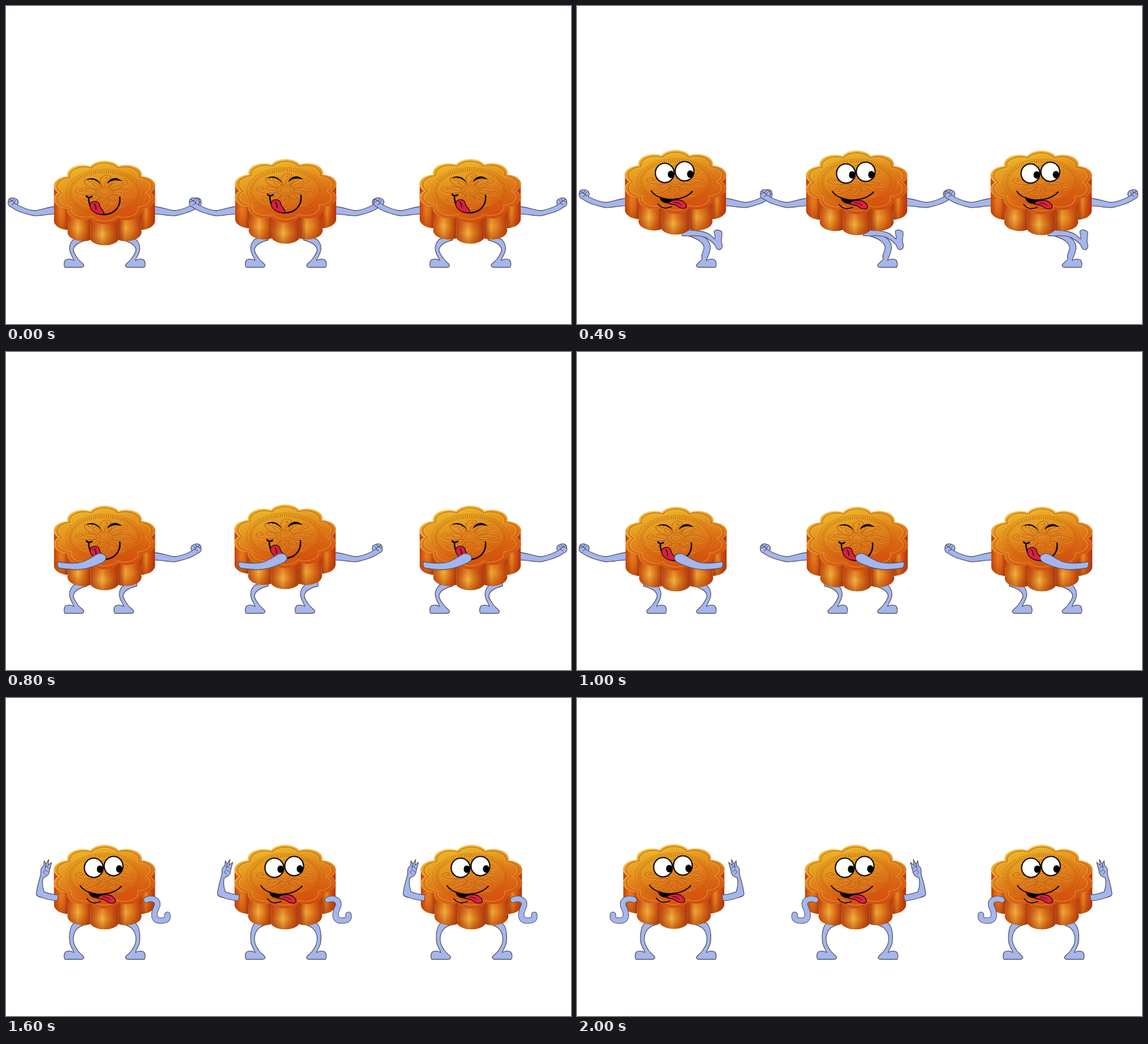
An HTML page for the animation above (2.2 s loop, 998 px wide and 561 px high).

```html
<!DOCTYPE html>
<html lang="en">
<head>
<meta charset="utf-8">
<title>Dancing mooncakes</title>
<style>
  html, body { margin: 0; width: 100%; height: 100%; overflow: hidden; background: #fff; }
  svg { display: block; width: 100vw; height: 100vh; }
  .limb { fill: #a5b5ee; stroke: #55565e; stroke-width: 1.3; stroke-linejoin: round; }
  .line { fill: none; stroke: #3d4050; stroke-width: 1; stroke-linecap: round; }
  .ink { fill: none; stroke: #0b0706; stroke-width: 2.6; stroke-linecap: round; }
</style>
</head>
<body>
<svg id="stage" viewBox="0 0 998 561" xmlns="http://www.w3.org/2000/svg"></svg>
<script>
const STEP = 200;
const CX = 174, CY = 329, WALL = 38, TILT = 0.6;
const VALLEY = 80, BUMP = 27;

const path = (d, attrs = '') => `<path d="${d}" ${attrs}/>`;
const limb = d => path(d, 'class="limb"');
const line = d => path(d, 'class="line"');
const group = (id, body) => `<g id="${id}">${body}</g>`;
const use = (id, transform = '') => `<use href="#${id}" transform="${transform}"/>`;
const mirrored = id => use(id, 'translate(348.5 0) scale(-1 1)');
const stops = list => list.map(([at, color]) => `<stop offset="${at}" stop-color="${color}"/>`).join('');
const gradient = (id, list, box = 'x2="1" y2="0"') => `<linearGradient id="${id}" ${box}>${stops(list)}</linearGradient>`;

// Cake: ten petals seen at a tilt, with a fluted wall below the front five.
const valley = (i, k = 1, drop = 0) => {
  const a = i * Math.PI / 5;
  return `${(CX + VALLEY * k * Math.cos(a)).toFixed(1)} ${(CY + drop + VALLEY * TILT * k * Math.sin(a)).toFixed(1)}`;
};
const bump = (k = 1) => `A${BUMP * k} ${BUMP * TILT * k} 0 0 1 `;

function flower(k) {
  let d = 'M' + valley(0, k);
  for (let i = 1; i <= 10; i++) d += bump(k) + valley(i, k);
  return d + 'Z';
}

function pillar(i) {
  const start = i === 0 ? 'M263.2 314V379' : `M${valley(i)}L${valley(i, 1, WALL)}`;
  const end = i === 4 ? '84.8 379V314' : `${valley(i + 1, 1, WALL)}L${valley(i + 1)}`;
  return path(start + bump() + end + 'Z', `fill="url(#wall${i})"`) +
    path(start + bump() + end + 'Z', 'fill="url(#shade)"');
}

function relief() {
  const scroll = 'M12 -3C22 -14 40 -18 50 -8C54 2 42 8 39 -1C39 -6 45 -6 45 -2M14 4C24 9 34 9 37 5';
  let marks = '<circle r="9"/><circle r="14" opacity=".5"/>';
  for (let i = 0; i < 8; i++) {
    marks += `<g transform="rotate(${i * 45 + 10})">${path(scroll)}<ellipse cx="25" rx="10" ry="4"/></g>`;
  }
  const layer = (color, shift) =>
    `<g transform="translate(${CX} ${CY + shift}) scale(1 ${TILT})" fill="none" stroke="${color}" stroke-width="2">${marks}</g>`;
  const ring = (r, attrs) => `<ellipse cx="${CX}" cy="${CY}" rx="${r}" ry="${r * TILT}" fill="none" ${attrs}/>`;
  return ring(68, 'stroke="#b9500c" stroke-opacity=".35" stroke-width="1.2"') +
    ring(61, 'stroke="#b4510a" stroke-opacity=".6" stroke-width="6" stroke-dasharray="1.3 2.5"') +
    layer('#efab40a0', 1.1) + layer('#b9560ca8', 0);
}

const cake =
  path('M86 316H262V379H86Z', 'fill="#b93a0a"') +
  [0, 4, 1, 3, 2].map(pillar).join('') +
  path(flower(1), 'fill="url(#top)" stroke="url(#rim)" stroke-width="1.6"') +
  path(flower(0.94), 'fill="none" stroke="#c4600f" stroke-opacity=".75" stroke-width="1.5"') +
  path(flower(0.91), 'fill="none" stroke="#f3bb4c" stroke-opacity=".5" stroke-width="1.2"') +
  relief();

// Faces
const laugh =
  path('M140 308C148 301 161 302 168 315C159 306 151 304 140 308Z') +
  path('M178 314C183 302 196 300 205 309C194 306 186 307 178 314Z') +
  path('M142 335Q145 340 152 336M146 338C146 356 156 368 174 368C192 367 203 354 201 337', 'class="ink"') +
  path('M149 349C152 343 162 343 165 350C165 357 174 361 173 367C166 369 155 366 150 358C148 355 148 352 149 349Z',
    'fill="#d91f43" stroke="#20090a" stroke-width="1.4"') +
  path('M156 349Q159 353 159 359', 'class="ink" style="stroke-width:1.6"');

const eye = (x, y, px, py) =>
  `<ellipse cx="${x}" cy="${y}" rx="16.6" ry="17" fill="#fff" stroke="#0b0706" stroke-width="2.2"/>` +
  `<ellipse cx="${px}" cy="${py}" rx="5.6" ry="6.6"/>`;
const goofy =
  eye(155, 313.5, 166, 316) + eye(190, 310.5, 200, 315.5) +
  path('M146 355C146 364 154 368 166 367L175 360C164 360 154 359 146 355Z') +
  path('M161 367C165 361 176 360 184 362C190 364 195 371 193 374C189 378 181 376 176 371C171 368 166 369 161 367Z',
    'fill="#dc2340" stroke="#20090a" stroke-width="1.4"') +
  path('M171 365Q179 365 184 370', 'class="ink" style="stroke-width:1"') +
  path('M131 345C142 363 185 367 204 346', 'class="ink" style="stroke-width:2"') +
  path('M143 368C149 376 158 377 167 373', 'class="ink" style="stroke-width:1.8"');

// Limbs, drawn for one side and mirrored for the other.
const reach =
  limb('M92 353C75 354 66 359 52 361C40 361 28 355 20 351C23 346 22 341 15 339C9 337 4 340 4 345C3 350 5 354 10 355C20 363 35 367 50 370C62 371 75 366 92 367Z') +
  line('M5 346L11 343L15 348L10 351M14 340L11 345M17 343L14 347L19 350M6 341L10 343');
const across =
  limb('M257 370C240 373 225 374 212 370C203 366 196 362 190 358C183 353 172 356 172 363C172 369 178 372 184 374C195 379 210 384 226 384C238 384 250 382 255 381C258 378 258 373 257 370Z');
const salute =
  limb('M91 364L80 367C76 356 70 345 69 337C69 331 76 328 84 325C92 321 100 318 106 316C110 312 115 309 121 309L130 311L127 314L136 315L129 319C122 323 112 323 104 324C96 327 88 331 85 336C86 345 91 355 91 364Z') +
  line('M109 315L118 313L122 316M112 319L118 317L122 320M121 312L128 314L122 317');
const raise =
  limb('M256 347C264 348 274 344 281 342C284 334 285 325 283 317C276 315 272 311 272 305L268 290L274 295L273 285L278 293L281 287L282 296C288 299 287 306 287 311C290 322 294 334 295 346C294 350 290 351 285 352C275 356 265 357 258 358Z') +
  line('M273 301L277 296L280 301M274 307L279 303L283 307L279 311M278 293L279 298');
const curlPath = 'M248 370.5C259 366 269 371 267 381C262 391 258 405 270 407C280 408 287 406 285 397';
const curl = ['#55565e" stroke-width="11', '#a5b5ee" stroke-width="8.8']
  .map(s => path(curlPath, `fill="none" stroke-linecap="round" stroke="${s}"`)).join('');

const foot = 'C115 446 109 446 105 448C102 452 102 458 104 461L133 461C137 461 139 458 136 455C132 451 129 449 127 446';
const leg = lift => limb(
  `M120 ${411 - lift}C112 ${418 - lift} 111 ${427 - lift / 2} 113 433C115 440 119 445 120 449${foot}` +
  `C124 441 118 435 119 ${429 - lift / 2}C121 ${421 - lift} 130 ${416 - lift} 143 ${413 - lift}V${405 - lift}Z`);
const kick =
  limb(`M152 396C125 402 112 414 113 428C115 440 119 445 120 449${foot}C131 442 125 434 124 426C126 414 142 408 160 403Z`) +
  limb('M163 395C140 395 120 398 113 404L105 411C103 408 107 402 106 397C103 394 97 395 93 398C91 404 95 412 93 418C91 424 92 429 97 430C102 430 103 426 105 421C112 414 118 409 126 407C138 403 150 407 163 405Z');

const up = 'translate(0 -14.5)';
const lifted = (id, side = s => use(s)) => `<g transform="${up}">${side(id)}</g>`;

const legs = {
  squat: use('leg') + mirrored('leg'),
  tall: use('longLeg') + mirrored('longLeg'),
  stepLeft: use('leg') + use('leg', 'translate(88 0)'),
  stepRight: mirrored('leg') + use('leg', 'translate(260.5 0) scale(-1 1)'),
  kickLeft: use('kick'),
  kickRight: mirrored('kick')
};
const arms = {
  wide: [use('reach') + mirrored('reach'), ''],
  wideUp: [lifted('reach') + lifted('reach', mirrored), ''],
  pointLeft: [use('reach'), use('across')],
  pointRight: [mirrored('reach'), mirrored('across')],
  saluteLeft: ['', use('salute') + use('curl')],
  saluteRight: ['', mirrored('salute') + mirrored('curl')],
  waveLeft: ['', mirrored('raise') + lifted('curl')],
  waveRight: ['', use('raise') + lifted('curl', mirrored)]
};

// face, arms, legs, limb x per dancer, cake x per dancer, cake y per dancer
const EVEN = [0, 320, 646];
const poses = [
  ['laugh', 'wide', 'squat', EVEN, EVEN, [0, -3, -3]],
  ['goofy', 'wideUp', 'kickLeft', EVEN, EVEN, [-18, -17, -18]],
  ['goofy', 'wideUp', 'kickRight', EVEN, EVEN, [-19, -18, -18]],
  ['laugh', 'pointLeft', 'stepRight', EVEN, [0, 319, 646], [-2, -4, -2]],
  ['laugh', 'pointRight', 'stepLeft', EVEN, [0, 319, 646], [-2, -4, -2]],
  ['laugh', 'pointLeft', 'stepRight', EVEN, [1, 321, 647], [0, 0, 0]],
  ['laugh', 'pointRight', 'stepLeft', EVEN, [1, 321, 647], [0, 0, 0]],
  ['goofy', 'saluteLeft', 'squat', [0, 320, 648], [0, 319, 648], [0, 0, 0]],
  ['goofy', 'waveLeft', 'tall', [0, 320, 648], [0, 319, 648], [-14, -14, -14]],
  ['goofy', 'saluteRight', 'squat', [-1, 323, 649], [-3, 320, 646], [0, 0, 0]],
  ['goofy', 'waveRight', 'tall', [0, 321, 650], [-3, 318, 647], [-15, -14, -14]]
];

function dancer([face, arm, leg, limbX, cakeX, cakeY], i) {
  const [behind, front] = arms[arm];
  const at = content => `<g transform="translate(${limbX[i]} 0)">${content}</g>`;
  return at(behind + legs[leg]) +
    `<g transform="translate(${cakeX[i]} ${cakeY[i]})">${use('cake')}${use(face)}</g>` +
    at(front);
}

const wallStops = [
  [[0, '#b8420c'], [0.35, '#e88a22'], [0.6, '#d35a10'], [1, '#b4300a']],
  [[0, '#a9360a'], [0.3, '#efa634'], [0.55, '#e38420'], [1, '#b23a0a']],
  [[0, '#b8440c'], [0.42, '#f0b440'], [0.6, '#dd8420'], [1, '#a8340a']],
  [[0, '#c04a0c'], [0.45, '#f2b03c'], [0.7, '#dc7a1a'], [1, '#ab380a']],
  [[0, '#c2410b'], [0.45, '#e87c1c'], [0.7, '#e2701a'], [1, '#b03a0a']]
];

document.getElementById('stage').innerHTML =
  '<defs>' +
  gradient('top', [[0, '#edbd2c'], [0.3, '#e59a20'], [0.6, '#dd7216'], [1, '#d4440c']], 'x1=".3" y1="0" x2=".7" y2="1"') +
  gradient('rim', [[0, '#f4d777'], [0.5, '#e39a38'], [1, '#c9470e']], 'x1=".3" y1="0" x2=".7" y2="1"') +
  '<linearGradient id="shade" x2="0" y2="1"><stop offset=".2" stop-color="#c8380a" stop-opacity=".45"/>' +
  '<stop offset=".6" stop-color="#c8380a" stop-opacity="0"/><stop offset="1" stop-color="#9a2c06" stop-opacity=".5"/></linearGradient>' +
  wallStops.map((list, i) => gradient('wall' + i, list)).join('') +
  Object.entries({ cake, laugh, goofy, reach, across, salute, raise, curl, kick, leg: leg(0), longLeg: leg(14) })
    .map(([id, body]) => group(id, body)).join('') +
  '</defs>' +
  poses.map(pose => `<g class="pose" visibility="hidden">${[0, 1, 2].map(i => dancer(pose, i)).join('')}</g>`).join('');

const frames = [...document.querySelectorAll('.pose')];
const startTime = performance.now();
let shown = -1;

function render(now) {
  const index = Math.floor(Math.max(0, now - startTime) / STEP) % frames.length;
  if (index !== shown) {
    frames.forEach((el, i) => el.setAttribute('visibility', i === index ? 'visible' : 'hidden'));
    shown = index;
  }
  requestAnimationFrame(render);
}
render(startTime);
</script>
</body>
</html>
```
